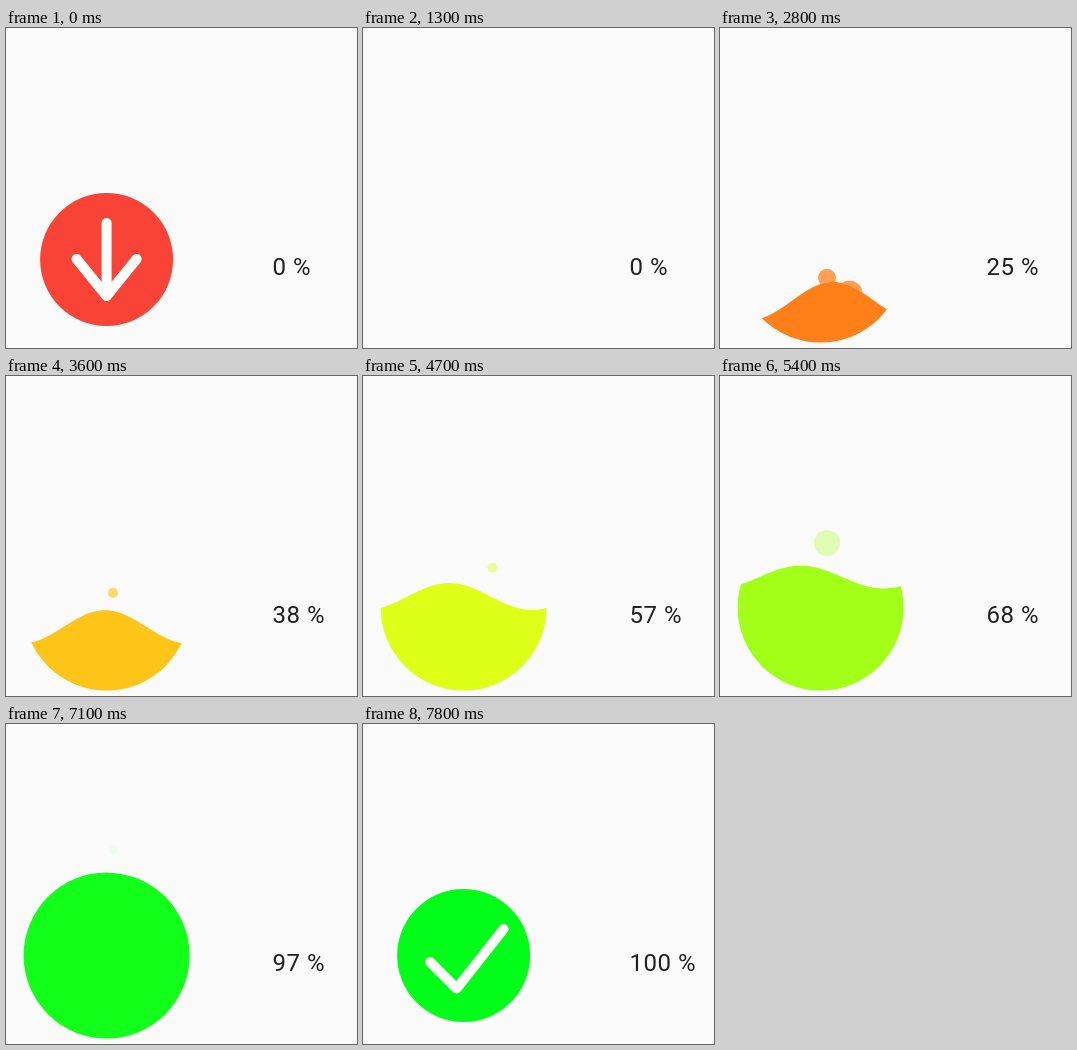
Animation of 351x320 px, one loop 7.9 s. Source, as an HTML page with a canvas:

```html
<!DOCTYPE html>
<html lang="en">
<head>
<meta charset="utf-8">
<title>Liquid download button</title>
<style>
  html, body { margin: 0; width: 100%; height: 100%; overflow: hidden; background: #fafafa; }
  canvas { position: absolute; left: 0; top: 0; width: 351px; height: 320px; }
  #label {
    position: absolute; left: 266.5px; top: 224px; white-space: pre;
    font: 24px/30px Roboto, sans-serif; letter-spacing: 0.5px; color: #212121;
  }
</style>
</head>
<body>
<canvas id="stage"></canvas>
<div id="label">0 %</div>
<script>
const W = 351, H = 320, LOOP = 7900, STEP = 100;
const CX = 100.6, CY = 231.5, BOWL = 83, BALL = 66.5;
const T = { press: 500, pour: 1300, full: 7300, jump: 7480, land: 7800 };

const canvas = document.getElementById('stage');
const label = document.getElementById('label');
const ctx = canvas.getContext('2d');
const dpr = window.devicePixelRatio || 1;
canvas.width = W * dpr;
canvas.height = H * dpr;

const clamp = v => Math.max(0, Math.min(1, v));
const span = (t, a, b) => clamp((t - a) / (b - a));
const progress = t => span(t, T.pour, T.full);
const levelAt = p => CY + BOWL - 2 * BOWL * p;

function disc(x, y, r, color) {
  ctx.fillStyle = color;
  ctx.beginPath();
  ctx.arc(x, y, r, 0, Math.PI * 2);
  ctx.fill();
}

function stroke(...points) {
  ctx.beginPath();
  points.forEach(([x, y]) => ctx.lineTo(x, y));
  ctx.stroke();
}

function liquidColor(p) {
  const r = Math.round(255 * clamp(2 - 2 * p));
  const g = Math.round(255 * clamp(2 * p));
  return `rgb(${r},${g},24)`;
}

// The crest drifts left at a slowly growing speed
function crestX(t) {
  const a = t - 2800;
  return 113 - a * (0.41485 + a * (2.426e-5 - 2.75e-9 * a));
}

function clipWave(t, p, edge) {
  const level = levelAt(p);
  const amp = 23.4 - 17.6 * p;
  const crest = crestX(t);
  ctx.beginPath();
  ctx.moveTo(0, edge);
  for (let x = 0; x <= 2 * CX; x++) {
    ctx.lineTo(x, level - amp * Math.cos((x - crest) * Math.PI / BOWL));
  }
  ctx.lineTo(2 * CX, edge);
  ctx.closePath();
  ctx.clip();
}

function drawButton(t) {
  const u = span(t, T.press, T.pour);
  const s = 1 - u * u;
  ctx.save();
  ctx.translate(CX, CY);
  ctx.scale(s, s);
  disc(0, 0, BALL, '#f94336');
  stroke([0, -36.5], [0, 36.5]);
  stroke([-30, -0.5], [0, 36.5], [30, -0.5]);
  ctx.restore();
}

// One bubble hops out of the surface every 300 ms
function drawBubbles(t, color) {
  for (let i = 0; i < 19; i++) {
    const peak = 1800 + 300 * i;
    const x = 107 + 26 * Math.sin(i * Math.PI * 2 / 3);
    const y = levelAt(progress(peak)) - 34 + 0.0008 * (t - peak) ** 2;
    disc(x, y, 9 + 4 * Math.cos(i * Math.PI / 2), color);
  }
}

function drawLiquid(t, p) {
  const color = liquidColor(p);
  ctx.save();
  clipWave(t, p, H);
  disc(CX, CY, BOWL, color);
  ctx.restore();

  ctx.save();
  clipWave(t, p, 0);
  ctx.globalAlpha = 1 - p;
  drawBubbles(t, color);
  ctx.restore();
}

function drawTick(k) {
  const a = [-33.5, 6.5], b = [-7, 33], c = [40, -26.5];
  const mix = (m, n, f) => m.map((v, i) => v + (n[i] - v) * f);
  const turn = 0.35;
  stroke(a, mix(a, b, clamp(k / turn)), mix(b, c, span(k, turn, 1)).map((v, i) => k < turn ? mix(a, b, k / turn)[i] : v));
}

function drawBall(t) {
  const u = span(t, T.jump, T.land);
  const r = BOWL + (BALL - BOWL) * span(t, T.full, T.jump);
  ctx.save();
  ctx.translate(CX, CY - 148 * 4 * u * (1 - u));
  disc(0, 0, r, liquidColor(1));
  const k = span(t, 7560, T.land);
  if (k > 0) drawTick(k);
  ctx.restore();
}

function render(t) {
  const p = progress(t);
  ctx.setTransform(dpr, 0, 0, dpr, 0, 0);
  ctx.fillStyle = '#fafafa';
  ctx.fillRect(0, 0, W, H);
  ctx.strokeStyle = '#fff';
  ctx.lineWidth = 10;
  ctx.lineCap = ctx.lineJoin = 'round';
  if (t < T.pour) drawButton(t);
  else if (t >= T.full) drawBall(t);
  else if (p > 0) drawLiquid(t, p);
  label.textContent = Math.round(p * 100) + ' %';
}

const start = performance.now();
function frame() {
  const t = (performance.now() - start) % LOOP;
  render(Math.floor(t / STEP) * STEP);
  requestAnimationFrame(frame);
}
frame();
</script>
</body>
</html>
```
